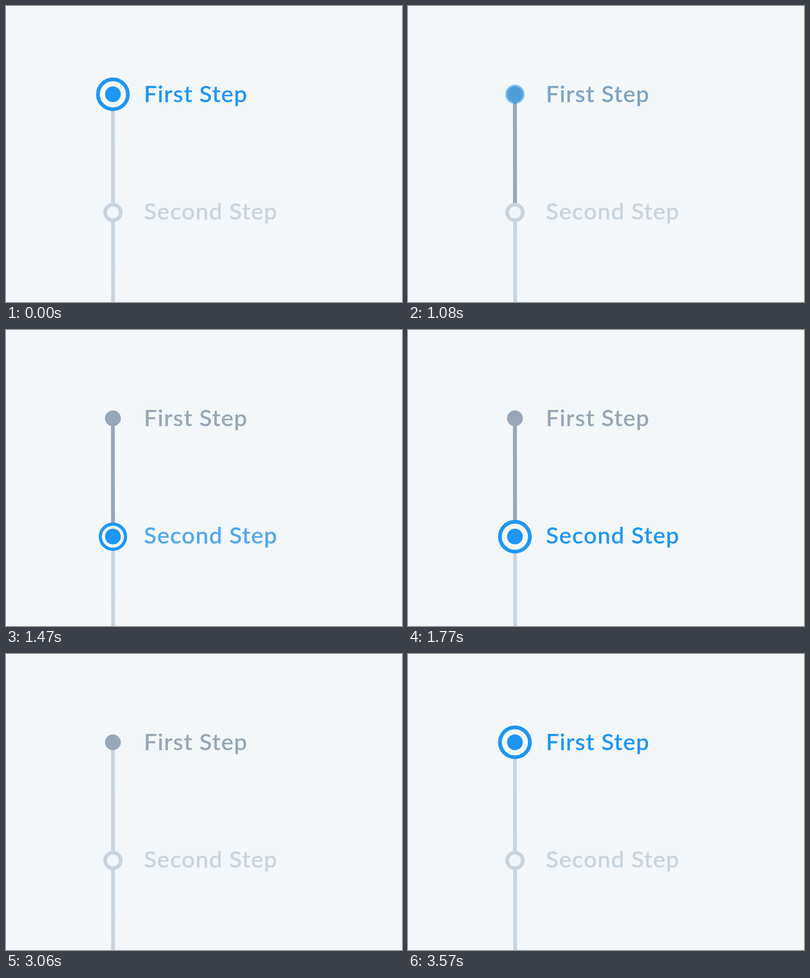
Write an HTML page that moves like this. It is 800 by 600 pixels and loops after 3630 ms.

```html
<!DOCTYPE html>
<html lang="en">
<head>
<meta charset="utf-8">
<title>Vertical stepper</title>
<style>
  html, body { margin: 0; height: 100%; overflow: hidden; background: #f3f7fa; }
  svg { display: block; width: 100%; height: 100%; }
  text { font: 600 47px Lato, "Open Sans", sans-serif; letter-spacing: 1.2px; }
  .track { stroke: #c9d4dd; stroke-width: 7.6; }
  .done { stroke: #97a7b7; }
  .hollow { fill: #f3f7fa; stroke: #c9d4dd; stroke-width: 7.5; }
  .ring { fill: #f3f7fa; stroke: #1e96f5; }
  .dot { fill: #1e96f5; }
</style>
</head>
<body>
<svg viewBox="0 0 800 600">
  <path class="track" d="M215.9 179L216.5 600"/>
  <line class="track done" id="progress" x1="215.9" y1="179"/>
  <circle cx="216" cy="179" r="16" fill="#97a7b7"/>
  <circle class="hollow" cx="216" cy="418.5" r="15.75"/>
  <g id="active1"><circle class="ring" cx="216" cy="179"/><circle class="dot" cx="216" cy="179" r="15.9"/></g>
  <g id="active2"><circle class="ring" cx="216" cy="419"/><circle class="dot" cx="216" cy="418.7" r="15.9"/></g>
  <text id="label1" x="278.5" y="194.5">First Step</text>
  <text id="label2" x="278.5" y="433">Second Step</text>
</svg>
<script>
const LOOP = 3630, TICK = 30;
const BLUE = [30, 150, 245], GREY = [151, 167, 183], PALE = [201, 212, 221];
const $ = id => document.getElementById(id);

const easeOut = (t, start, duration, power) =>
  1 - (1 - Math.min(1, Math.max(0, (t - start) / duration))) ** power;

const mix = (from, to, p) =>
  `rgb(${from.map((v, i) => Math.round(v + (to[i] - v) * p))})`;

function drawStep(n, active, restColor) {
  const group = $('active' + n), ring = group.firstElementChild;
  const outer = 16 + 18 * active, width = 7.5 * outer / 34;
  ring.setAttribute('r', outer - width / 2);
  ring.setAttribute('stroke-width', width);
  group.setAttribute('opacity', Math.min(1, active * 3));
  $('label' + n).setAttribute('fill', mix(restColor, BLUE, active));
}

function draw(t) {
  const first = 1 - easeOut(t, 910, 400, 3) + easeOut(t, 3160, 420, 4);
  const second = easeOut(t, 1360, 420, 4) - easeOut(t, 2710, 350, 3);
  const line = easeOut(t, 910, 385, 5) - easeOut(t, 2710, 350, 5);
  drawStep(1, first, GREY);
  drawStep(2, second, PALE);
  $('progress').setAttribute('x2', 215.9 + .3 * line);
  $('progress').setAttribute('y2', 179 + 240 * line);
}

const begin = performance.now();
function frame() {
  const t = (performance.now() - begin) % LOOP;
  draw(Math.floor(t / TICK) * TICK);
  requestAnimationFrame(frame);
}
frame();
</script>
</body>
</html>
```
